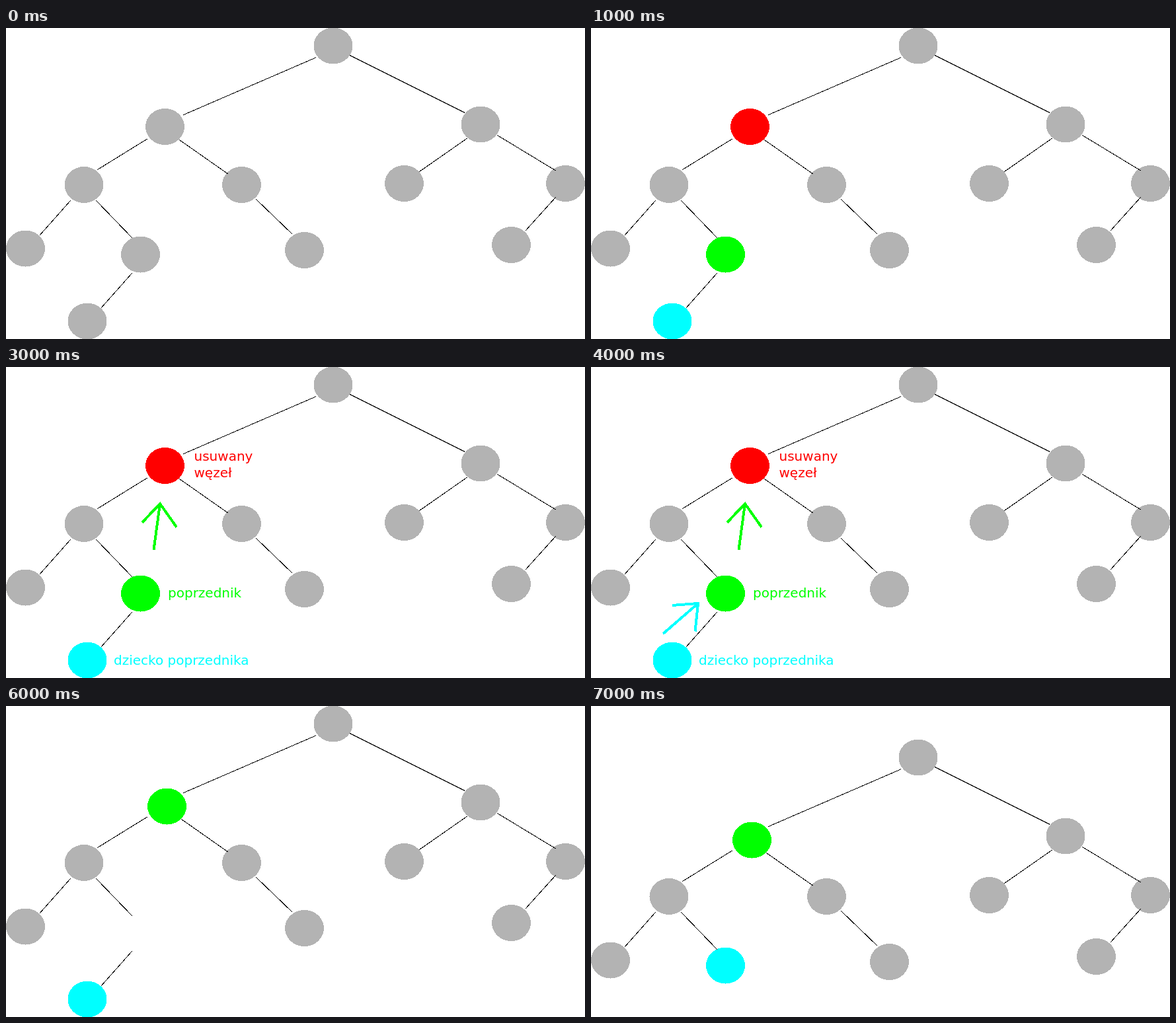
An HTML page that plays this animation: 876 px wide and 471 px high, repeating every 8000 ms.

```html
<!DOCTYPE html>
<html lang="pl">
<head>
<meta charset="utf-8">
<title>Usuwanie węzła z drzewa</title>
<style>
html, body { margin: 0; width: 100%; height: 100%; overflow: hidden; background: #fff; }
svg { display: block; width: 876px; height: 471px; }
text { font: 20px "DejaVu Sans", sans-serif; }
line { stroke: #000; stroke-width: 1; }
path { fill: none; stroke-width: 4; }
ellipse, line, path { shape-rendering: crispEdges; }
</style>
</head>
<body>
<svg viewBox="0 0 876 471"><g id="tree"></g></svg>
<script>
const GRAY = '#b3b3b3', RED = '#f00', GREEN = '#0f0', CYAN = '#0ff';
const LOOP = 8000;
const tree = document.getElementById('tree');

function add(tag, attrs, text) {
  const el = document.createElementNS('http://www.w3.org/2000/svg', tag);
  for (const k in attrs) el.setAttribute(k, attrs[k]);
  if (text) el.textContent = text;
  return tree.appendChild(el);
}
const node = (cx, cy, fill = GRAY) => add('ellipse', { cx, cy, rx: 29.5, ry: 27.5, fill });
const edge = (x1, y1, x2, y2) =>
  add('line', { x1: x1 + .5, y1: y1 + .5, x2: x2 + .5, y2: y2 + .5 });
const label = (x, y, fill, text) => add('text', { x, y, fill }, text);
const arrow = (stroke, d) => add('path', { stroke, d });

[[495, 27], [118, 237.5], [356.5, 237.5], [29.5, 334], [451.5, 336.5],
 [718, 146], [602.5, 235.5], [846.5, 235.5], [764.5, 328.5]].forEach(p => node(...p));
const removed = node(240.5, 149.5);
const pred = node(203.5, 343);
const child = node(123, 444);

[[469, 44, 268, 131], [520, 41, 694, 128], [214, 167, 138, 214],
 [97, 261, 50, 314], [136, 261, 191, 318], [378, 259, 433, 312],
 [698, 166, 625, 217], [743, 162, 832, 216], [831, 256, 785, 307]].forEach(p => edge(...p));
const rightEdge = edge(262, 169, 336, 221);
const childEdge = edge(190, 371, 143, 424);

const labels = [
  label(284.5, 142, RED, 'usuwany'),
  label(284.5, 167, RED, 'węzeł'),
  label(245, 349, GREEN, 'poprzednik'),
  label(163, 451, CYAN, 'dziecko poprzednika')
];
const upArrow = arrow(GREEN, 'M223.5 277L233 207M206 235.5L233 207L258 242.5');
const sideArrow = arrow(CYAN, 'M109 404L162 358M123 361L162 358L157.5 400.5');

const show = (el, on) => el.setAttribute('visibility', on ? 'visible' : 'hidden');
function place(el, cx, cy) {
  el.setAttribute('cx', cx);
  el.setAttribute('cy', cy);
}

function draw(ms) {
  const step = Math.floor(ms % LOOP / 1000);
  const marked = step > 0, moved = step > 5, done = step > 6;

  removed.setAttribute('fill', marked ? RED : GRAY);
  pred.setAttribute('fill', marked ? GREEN : GRAY);
  child.setAttribute('fill', marked ? CYAN : GRAY);
  show(removed, step < 5);
  labels.forEach(l => show(l, step > 1 && step < 5));
  show(upArrow, step > 2 && step < 5);
  show(sideArrow, step === 4);

  place(pred, moved ? 243.5 : 203.5, moved ? 152 : 343);
  place(child, done ? 203.5 : 123, done ? 342 : 444);
  rightEdge.setAttribute('x1', moved ? 265.5 : 262.5);
  rightEdge.setAttribute('y1', moved ? 171.5 : 169.5);
  show(childEdge, !done);
  tree.setAttribute('transform', `translate(0 ${done ? 51 : 0})`);
}

let start;
function tick(now) {
  start ??= now;
  draw(now - start);
  requestAnimationFrame(tick);
}
draw(0);
requestAnimationFrame(tick);
</script>
</body>
</html>
```
